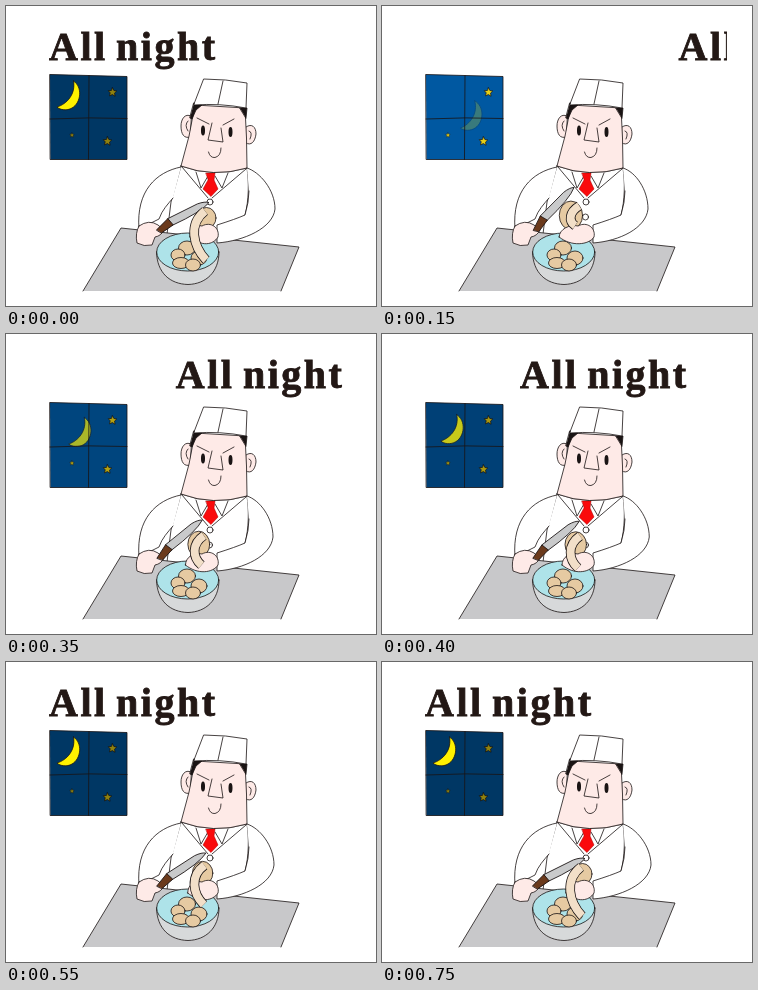
Write an HTML page that moves like this. It is 370x300 px and loops after 1000 ms.

```html
<!DOCTYPE html>
<html lang="en">
<head>
<meta charset="utf-8">
<title>All night</title>
<style>
  html, body { margin: 0; width: 100%; height: 100%; overflow: hidden; background: #fff; }
  svg { display: block; width: 370px; height: 300px; }
  .ink { stroke: #1a1414; stroke-width: .8; stroke-linejoin: round; stroke-linecap: round; }
  .line { fill: none; }
  .white { fill: #fff; }
  .skin { fill: #feeae7; }
  .tan { fill: #e6caa2; }
  .title {
    font: bold 40px "Liberation Serif", "Times New Roman", serif;
    letter-spacing: 2.5px; word-spacing: -4px;
    fill: #231815; stroke: #231815; stroke-width: .8;
  }
</style>
</head>
<body>
<svg viewBox="0 0 370 300">
  <defs>
    <clipPath id="titleArea"><rect x="0" y="0" width="345" height="68"/></clipPath>
    <path id="star" d="M0 -5 L1.6 -1.8 L5 -1.2 L2.4 1.3 L3 5 L-.2 3 L-3.5 4.6 L-2.7 1 L-5 -1.6 L-1.6 -1.8Z"/>
  </defs>

  <g clip-path="url(#titleArea)"><text id="title" class="title" y="54">All night</text></g>

  <g id="window">
    <path d="M44 68.5 L121 70.5 V153.5 H44.5Z" fill="#0061b2"/>
    <g class="ink" fill="#ffe51a">
      <use href="#star" transform="translate(106.500 86) scale(.85)"/>
      <use href="#star" transform="translate(101.500 135) scale(.85)"/>
      <use href="#star" transform="translate(66 129) scale(.45)"/>
    </g>
    <path id="dusk" d="M44 68.5 L121 70.5 V153.5 H44.5Z"/>
    <path id="moon" class="ink" fill="#fff100" d="M67.500 75 C77 81 75 97 66 102 C61 105 54 104 51 101 C61 98 70 88 67.500 75Z"/>
    <path class="ink line" d="M44 68.5 L121 70.5 V153.5 H44.5Z M83 69.5 L82.5 153.5 M44 113 Q84 111 121 112.500"/>
  </g>

  <g id="body" class="ink">
    <path class="white" d="M175 160 C172 172 168 184 165 196 L160 236 H225 L239 209 C243 194 243 176 241 162 Q207 172 175 160Z"/>
    <path class="line" d="M176 161 L202 192 M240 163 L206 192"/>
    <path class="white" d="M190 166 L195 182 L202 170 M209 170 L216 182 L222 167"/>
    <path d="M200 167 L209 167 L208 174 L212 183 L205 190.500 L197 183 L202 174Z" fill="#fa0a0c" stroke="#a00" stroke-width=".5"/>
    <circle class="white" cx="204" cy="196" r="3"/>
    <circle class="white" cx="203.500" cy="211" r="3"/>
  </g>

  <g id="head" class="ink">
    <path class="skin" d="M185 110 C179 107 175 113 175 120 C175 128 178 133 184 131Z"/>
    <path class="skin" d="M240 121 C246 117 250 121 250 128 C249 136 245 140 240 137Z"/>
    <path class="line" d="M182 115 Q178 119 182 125 M243 125 Q247 126 244 133"/>
    <path class="skin" d="M189 99 L239 102 Q241 132 241 162 Q207 172 175 160 Q184 131 189 99Z"/>
    <path d="M188 97 L196 99 L190 104 L186 113 L184 112Z M234 102 L241 102 L240 112Z" fill="#1a1414"/>
    <path class="white" d="M198 73 Q220 73 241 77 L240 102 Q214 97 188 99Z"/>
    <path class="line" d="M217 75 L212 98"/>
    <path class="line" d="M191 112 L203 118 M217 119 L228 113 M206 117 L202 134 L217 136 L215 122"/>
    <path class="line" d="M202.500 146 Q204 152 209 151.500 Q215 150 215 142"/>
    <ellipse cx="197" cy="124.500" rx="2" ry="5" fill="#1a1414" stroke="none"/>
    <ellipse cx="224.500" cy="126" rx="2" ry="5" fill="#1a1414" stroke="none"/>
  </g>

  <g id="table">
    <path d="M115 222 L293 241 L275 285 H77Z" fill="#c8c8ca"/>
    <path class="ink line" d="M77 285 L115 222 L293 241 L275 285"/>
  </g>

  <g id="bowl" class="ink">
    <path d="M150.500 246 C151 267 164 278 182 278.500 C200 278 213 266 213 246Z" fill="#d7d9da"/>
    <ellipse cx="181.700" cy="246" rx="31" ry="19" fill="#aee3e9"/>
    <g class="tan">
      <ellipse cx="181" cy="242" rx="8.500" ry="7"/>
      <ellipse cx="172" cy="249" rx="7" ry="6"/>
      <ellipse cx="193" cy="252" rx="8" ry="7"/>
      <ellipse cx="175" cy="257" rx="8.500" ry="5.500"/>
      <ellipse cx="187" cy="259" rx="7.500" ry="6"/>
    </g>
  </g>

  <g class="ink">
    <path class="white" d="M175 161 C150 166 130 185 133 223 L153 213 C156 204 162 198 167 192"/>
    <path id="sleeve" class="white"/>
    <path class="skin" d="M133 220 Q143 213 152 219 L158 224 Q155 230 149 231 L146 239 Q138 241 131 237 Q129 227 133 220Z"/>
    <g id="knife">
      <path d="M13 -4 L46 -4 Q54 -3 57 0 Q46 5 14 4Z" fill="#c9cacb"/>
      <path d="M-2 1 L13 -4 L15 4 L1 6Z" fill="#6b3a1c"/>
    </g>
    <ellipse id="potato" class="tan"/>
    <path id="hand" class="skin"/>
  </g>
  <path id="peelEdge" fill="none" stroke="#1a1414" stroke-width="9.600"/>
  <path id="peel" fill="none" stroke="#f2dfc8" stroke-width="8"/>
</svg>

<script>
  const LOOP = 1000, STEP = 50, LAST = 14;
  const el = id => document.getElementById(id);
  const set = (id, attrs) => {
    for (const name in attrs) el(id).setAttribute(name, attrs[name]);
  };
  const mix = (a, b, p) => a + (b - a) * p;

  // Cubic curve of the peel, short at first, hanging into the bowl at the end
  const peelStart = [197, 199, 188, 204, 186, 211, 192, 214];
  const peelEnd = [199, 205, 182, 218, 187, 240, 200, 254];

  function draw(step) {
    const slide = Math.min(step / 10, 1);
    const night = Math.min(step / 9, 1);
    const cut = step / LAST;

    set('title', { x: mix(360, 43, slide) });
    set('dusk', { opacity: .44 * night });
    set('moon', {
      opacity: night,
      transform: `translate(${mix(34, 0, night)} ${mix(26, 0, night)}) rotate(${mix(-6, 0, night)} 62 90)`
    });
    set('knife', { transform: `translate(152 222) rotate(${mix(-48.5, -26.5, cut)})` });

    const x = mix(265.5, 269, cut);
    set('sleeve', {
      d: `M241 162 C254 166 ${x} 184 ${x} 203 C${x - 2} 222 238 235 211 237 L211 219 Q230 213 239 209 Q243 196 243 185`
    });
    set('potato', {
      cx: mix(187, 200.5, cut),
      cy: mix(209, 212, cut),
      rx: mix(12, 9.5, cut),
      ry: mix(15, 10.5, cut)
    });
    const left = mix(176, 184, cut);
    set('hand', {
      d: `M${left} 231 C${left} 223 188 218 196 220 C205 215 214 222 212 231 C207 239 ${left + 12} 241 ${left} 231Z`
    });

    const c = peelStart.map((v, i) => mix(v, peelEnd[i], cut));
    const d = `M${c[0]} ${c[1]} C${c.slice(2).join(' ')}`;
    set('peel', { d });
    set('peelEdge', { d });
  }

  function tick(now) {
    const slot = Math.floor((now % LOOP) / STEP);
    draw(slot === 0 ? LAST : Math.min(slot - 1, LAST));
    requestAnimationFrame(tick);
  }
  draw(LAST);
  requestAnimationFrame(tick);
</script>
</body>
</html>
```
